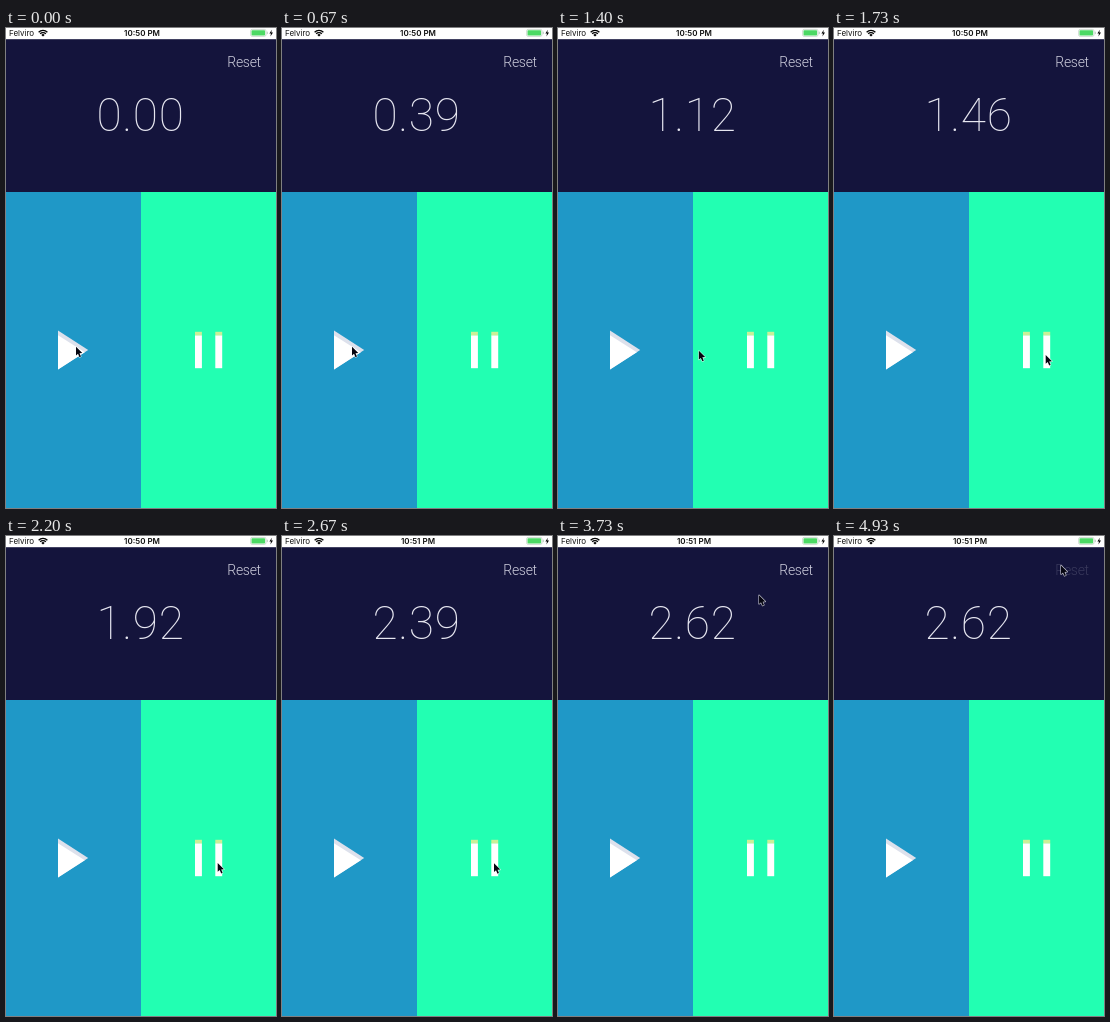
These frames come from a looping animation (270x480 px, 5.07 s). An HTML page with a canvas:

```html
<!DOCTYPE html>
<html lang="en">
<head>
<meta charset="utf-8">
<title>Stopwatch</title>
<style>
  html, body { margin: 0; width: 100%; height: 100%; overflow: hidden; background: #14143c; }
  canvas { display: block; width: 100vw; height: 100vh; }
</style>
</head>
<body>
<canvas id="stage"></canvas>
<script>
const W = 270, H = 480, LOOP = 5070, FPS = 15;
const canvas = document.getElementById('stage');
const ctx = canvas.getContext('2d');
const ratio = window.devicePixelRatio || 1;
canvas.width = W * ratio;
canvas.height = H * ratio;

const START = 272, STOP_VALUE = 2.62;
const between = (t, a, b) => t >= a && t < b;
const smooth = u => u * u * (3 - 2 * u);

// Pointer stops: time, x, y
const path = [
  [0, 70, 318.7], [1200, 70, 318.7], [1600, 211.7, 327],
  [2400, 211.7, 327], [2600, 212, 327.3], [3400, 212, 327.3],
  [3730, 201, 59.3], [3870, 227, 29.5], [LOOP, 227, 29.5]
];

function pointerAt(t) {
  const i = path.findIndex(p => p[0] > t);
  const [t0, x0, y0] = path[i - 1], [t1, x1, y1] = path[i];
  const u = smooth((t - t0) / (t1 - t0));
  return [x0 + (x1 - x0) * u, y0 + (y1 - y0) * u];
}

function rect(color, x, y, w, h) {
  ctx.fillStyle = color;
  ctx.fillRect(x, y, w, h);
}

function trace(points) {
  ctx.beginPath();
  points.forEach(([x, y]) => ctx.lineTo(x, y));
  ctx.closePath();
}

function poly(color, points) {
  trace(points);
  ctx.fillStyle = color;
  ctx.fill();
}

function text(str, x, y, font, color, align = 'left', spacing = 0) {
  ctx.font = font;
  ctx.letterSpacing = spacing + 'px';
  ctx.fillStyle = color;
  ctx.textAlign = align;
  ctx.fillText(str, x, y);
}

function wifi(x, y) {
  const a = Math.PI * 1.25, b = Math.PI * 1.75;
  ctx.strokeStyle = '#000';
  ctx.lineWidth = 1.3;
  for (const r of [6.2, 4]) {
    ctx.beginPath();
    ctx.arc(x, y, r, a, b);
    ctx.stroke();
  }
  ctx.beginPath();
  ctx.moveTo(x, y);
  ctx.arc(x, y, 2.4, a, b);
  ctx.fillStyle = '#000';
  ctx.fill();
}

function battery() {
  ctx.strokeStyle = '#b4c4b8';
  ctx.lineWidth = 0.6;
  ctx.beginPath();
  ctx.roundRect(244.6, 1.4, 15.4, 7, 1.6);
  ctx.stroke();
  ctx.fillStyle = '#4cd964';
  ctx.beginPath();
  ctx.roundRect(245.5, 2.3, 13.6, 5.2, 0.8);
  ctx.fill();
  rect('#b4c4b8', 260.8, 3.7, 0.9, 2.4);
  poly('#000', [[265.8, 1.8], [263.4, 5.4], [265, 5.4], [264.4, 8.4], [267, 4.5], [265.3, 4.5]]);
}

function statusBar(t) {
  rect('#fff', 0, 0, W, 11.2);
  text('Felviro', 3, 8, '400 8px Inter, Roboto, sans-serif', '#111');
  wifi(37, 8.6);
  const clock = t < 2525 ? '10:50 PM' : '10:51 PM';
  text(clock, 136, 8, '600 8px Inter, Roboto, sans-serif', '#111', 'center');
  battery();
}

function playIcon(pressed) {
  poly(pressed ? '#74767c' : '#dde1ec', [[52, 302.6], [82.2, 322], [52, 341.6]]);
  poly(pressed ? '#808080' : '#fff', [[52, 307.3], [78.8, 324.2], [52, 341.6]]);
}

function pauseIcon(pressed) {
  for (const x of [189, 209.3]) {
    rect(pressed ? '#65784c' : '#caf098', x, 303.8, 6.9, 4);
    rect(pressed ? '#808080' : '#fff', x, 307.5, 6.9, 32.7);
  }
}

function pointer(x, y) {
  ctx.save();
  ctx.translate(x, y);
  ctx.scale(0.95, 0.95);
  trace([[0, 0], [0, 9.2], [2.1, 7.4], [3.7, 11], [5.2, 10.3], [3.7, 6.8], [6.6, 6.6]]);
  ctx.lineJoin = 'round';
  ctx.lineWidth = 1.3;
  ctx.strokeStyle = 'rgba(255,255,255,.75)';
  ctx.stroke();
  ctx.fillStyle = '#050510';
  ctx.fill();
  ctx.restore();
}

function draw(t) {
  ctx.setTransform(ratio, 0, 0, ratio, 0, 0);
  rect('#14143c', 0, 0, W, 164);
  rect('#1f98c7', 0, 164, 135, H - 164);
  rect('#22ffb2', 135, 164, 135, H - 164);
  statusBar(t);

  const seconds = Math.min(STOP_VALUE, Math.max(0, (t - START) / 1000));
  const shown = (Math.floor(seconds * 100 + 1e-6) / 100).toFixed(2);
  text(shown, 134.5, 102.5, '100 46px Roboto, Inter, sans-serif', '#e6e6f0', 'center', 0.7);

  ctx.globalAlpha = t >= 4925 ? 0.2 : 1;
  text('Reset', 221.3, 39, '300 14px Roboto, Inter, sans-serif', '#cfcfde', 'left', -0.3);
  ctx.globalAlpha = 1;

  playIcon(between(t, 260, 330));
  pauseIcon(between(t, 2860, 2930));
  pointer(...pointerAt(t));
}

const origin = performance.now();
function tick() {
  const t = (performance.now() - origin) % LOOP;
  // The picture advances in whole steps
  draw(Math.floor((t + 3.4) * FPS / 1000) * 1000 / FPS);
  requestAnimationFrame(tick);
}
tick();
</script>
</body>
</html>
```
